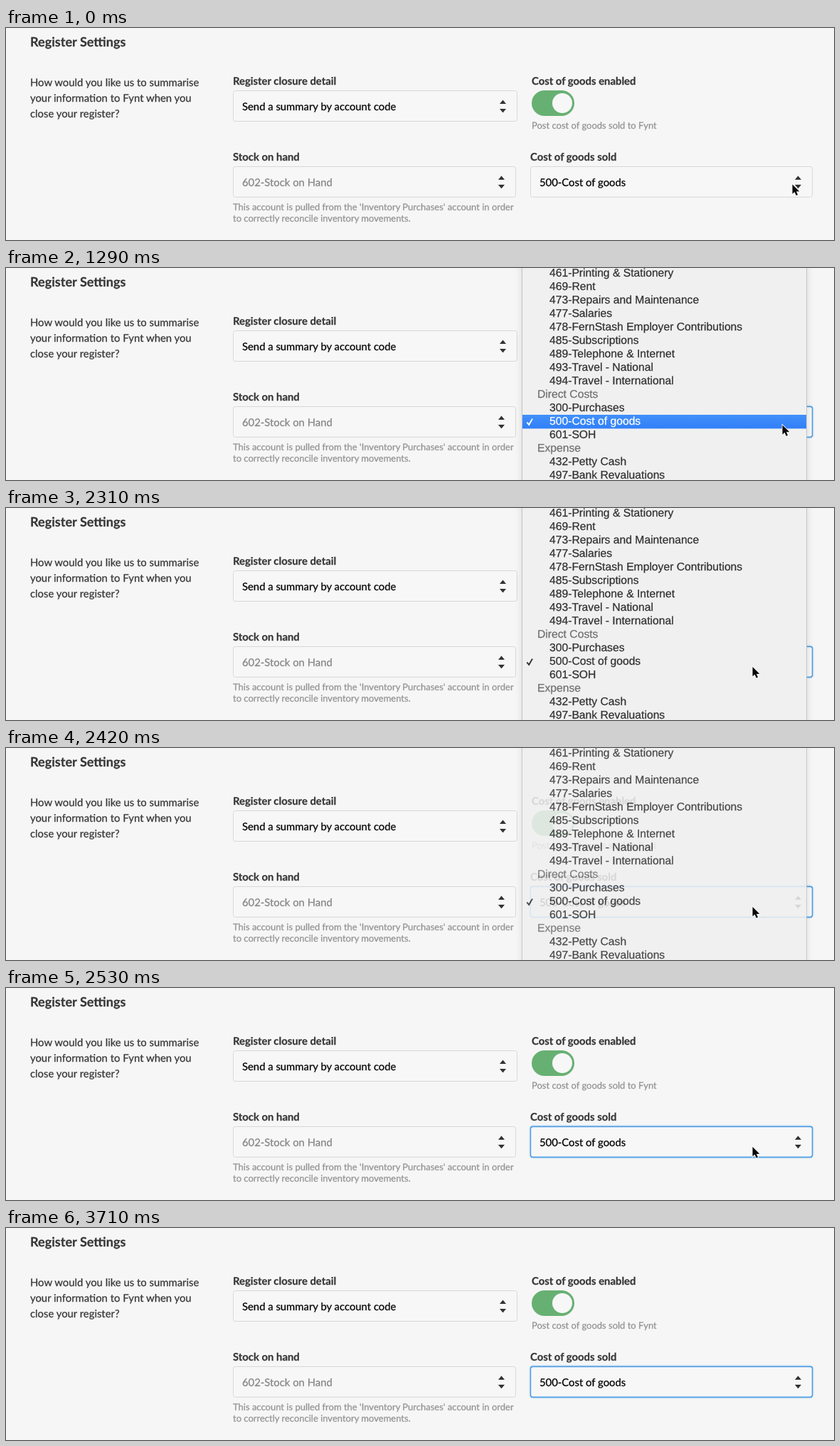
An HTML page for the animation above (4600 ms loop, 1164 by 299 pixels).

```html
<!DOCTYPE html>
<html lang="en">
<head>
<meta charset="utf-8">
<title>Register Settings</title>
<style>
  html, body { margin: 0; width: 100%; height: 100%; overflow: hidden; background: #f6f6f6; }
  svg { display: block; width: 1164px; height: 299px; }
  text {
    font: 14.85px Lato, sans-serif; white-space: pre; text-rendering: geometricPrecision;
    color: #363636; fill: currentColor; stroke: currentColor; stroke-width: .25;
  }
  .title { font-size: 18.1px; font-weight: 700; }
  .label { font-weight: 700; }
  .value { color: #000; }
  .disabled { color: #848484; }
  .hint { font-size: 13px; color: #929292; }
  .item, .group { font: 15.7px "Liberation Sans", Arial, sans-serif; color: #303030; }
  .group { color: #707070; }
  .field { fill: #f7f7f7; stroke: #d8d8d8; }
  .arrows { fill: #333; }
</style>
</head>
<body>
<svg id="stage" viewBox="0 0 1164 299" xmlns="http://www.w3.org/2000/svg">
  <defs>
    <linearGradient id="blue" x2="0" y2="1">
      <stop offset="0" stop-color="#4190fa"/>
      <stop offset="1" stop-color="#317ff8"/>
    </linearGradient>
    <filter id="shadow" x="-10%" y="-10%" width="120%" height="120%">
      <feDropShadow dx="0" dy="4" stdDeviation="5" flood-opacity=".13"/>
    </filter>
  </defs>
  <g id="page"></g>
  <g id="ring" fill="none">
    <rect x="736.5" y="194.5" width="398" height="45" rx="4" stroke="#9ccbf3" stroke-opacity=".55" stroke-width="2"/>
    <rect x="737.5" y="195.5" width="396" height="43" rx="3" stroke="#4597e0" stroke-width="1.3"/>
  </g>
  <g id="menu">
    <rect x="725.5" y="-20" width="400" height="340" fill="#f0f0f0" stroke="#c4c4c4" filter="url(#shadow)"/>
    <rect id="highlight" x="726" y="207" width="399" height="19.5" fill="url(#blue)"/>
    <path id="check" d="M732.3 217.6L735.2 221L740 212.6" fill="none" stroke-width="1.9"/>
    <g id="items"></g>
  </g>
  <path id="cursor" d="M0 0V13.6L3.1 10.7L5.3 15.7L7.6 14.7L5.5 9.9H9.9Z" fill="#0a0a0a" stroke="#fff" stroke-width="1.6" paint-order="stroke"/>
</svg>
<script>
const LOOP = 4600;
const OPEN = 240, PICK = 2310, CLOSED = 2530;
const REST = [1105.5, 220.5], OPTION = [1049.5, 224], EXIT = [1114, 302];
const CHOSEN = "500-Cost of goods";

const $ = id => document.getElementById(id);
const escape = s => s.replace(/&/g, "&amp;");
const text = (kind, x, y, s) => `<text class="${kind}" x="${x}" y="${y}">${escape(s)}</text>`;
const lines = (kind, x, y, step, list) =>
  list.map((s, i) => text(kind, x, y + i * step, s)).join("");

function select(x, y, width, kind, value) {
  const cx = x + width - 20.5, cy = y + 22;
  return `<rect class="field" x="${x + .5}" y="${y + .5}" width="${width - 1}" height="43" rx="3"/>
    <path class="arrows" d="M${cx - 4.5} ${cy - 3}h9l-4.5 -5.5zM${cx - 4.5} ${cy + 4}h9l-4.5 5.5z"/>`
    + text(kind, x + 13, y + 28, value);
}

$("page").innerHTML = [
  text("title", 34, 25.5, "Register Settings"),
  lines("body", 34, 81.5, 22, [
    "How would you like us to summarise",
    "your information to Fynt when you",
    "close your register?"]),
  text("label", 319, 79.5, "Register closure detail"),
  select(319, 88, 400, "value", "Send a summary by account code"),
  text("label", 739, 79.5, "Cost of goods enabled"),
  `<rect x="739" y="88" width="60" height="36" rx="18" fill="#67b073"/>
   <circle cx="782" cy="106" r="14" fill="#f7f7f7"/>`,
  text("hint", 739, 142, "Post cost of goods sold to Fynt"),
  text("label", 319, 186.5, "Stock on hand"),
  select(319, 195, 398, "disabled", "602-Stock on Hand"),
  lines("hint", 319, 257, 16, [
    "This account is pulled from the 'Inventory Purchases' account in order",
    "to correctly reconcile inventory movements."]),
  text("label", 737, 186.5, "Cost of goods sold"),
  select(737, 195, 397, "value", CHOSEN)
].join("");

const options = [
  "461-Printing & Stationery", "469-Rent", "473-Repairs and Maintenance",
  "477-Salaries", "478-FernStash Employer Contributions", "485-Subscriptions",
  "489-Telephone & Internet", "493-Travel - National",
  "494-Travel - International", "Direct Costs", "300-Purchases", CHOSEN,
  "601-SOH", "Expense", "432-Petty Cash", "497-Bank Revaluations"
];
$("items").innerHTML = options.map((s, i) => {
  const isItem = /^\d/.test(s);
  return text(isItem ? "item" : "group", isItem ? 764 : 747, 12.3 + 19 * i, s);
}).join("");
const chosenText = $("items").children[options.indexOf(CHOSEN)];

// Progress that advances in equal jumps, the first one at the start time.
function stepped(t, start, end, steps) {
  if (t < start) return 0;
  const done = Math.floor((t - start) / (end - start) * (steps - 1) + 1e-6) + 1;
  return Math.min(1, done / steps);
}
const mix = (a, b, p) => a.map((v, i) => v + (b[i] - v) * p);

function menuOpacity(t) {
  if (t < OPEN || t >= CLOSED) return 0;
  return t < 2420 ? 1 : t < 2470 ? .87 : .4;
}

function render(t) {
  const opacity = menuOpacity(t);
  $("menu").setAttribute("opacity", opacity);
  $("menu").style.display = opacity ? "" : "none";
  $("ring").style.display = t < OPEN ? "none" : "";

  const lit = t < PICK || (t >= 2360 && t < 2420);
  $("highlight").style.display = lit ? "" : "none";
  $("check").setAttribute("stroke", lit ? "#fff" : "#303030");
  chosenText.style.color = lit ? "#fff" : "";

  const leave = stepped(t, 3190, 3710, 10);
  const at = leave
    ? mix(OPTION, EXIT, leave ** 1.25)
    : mix(REST, OPTION, stepped(t, 1290, 1470, 4));
  $("cursor").setAttribute("transform", `translate(${at})`);
  $("cursor").style.display = leave < 1 ? "" : "none";
}

const begin = performance.now();
function tick() {
  render((performance.now() - begin) % LOOP);
  requestAnimationFrame(tick);
}
tick();
</script>
</body>
</html>
```
